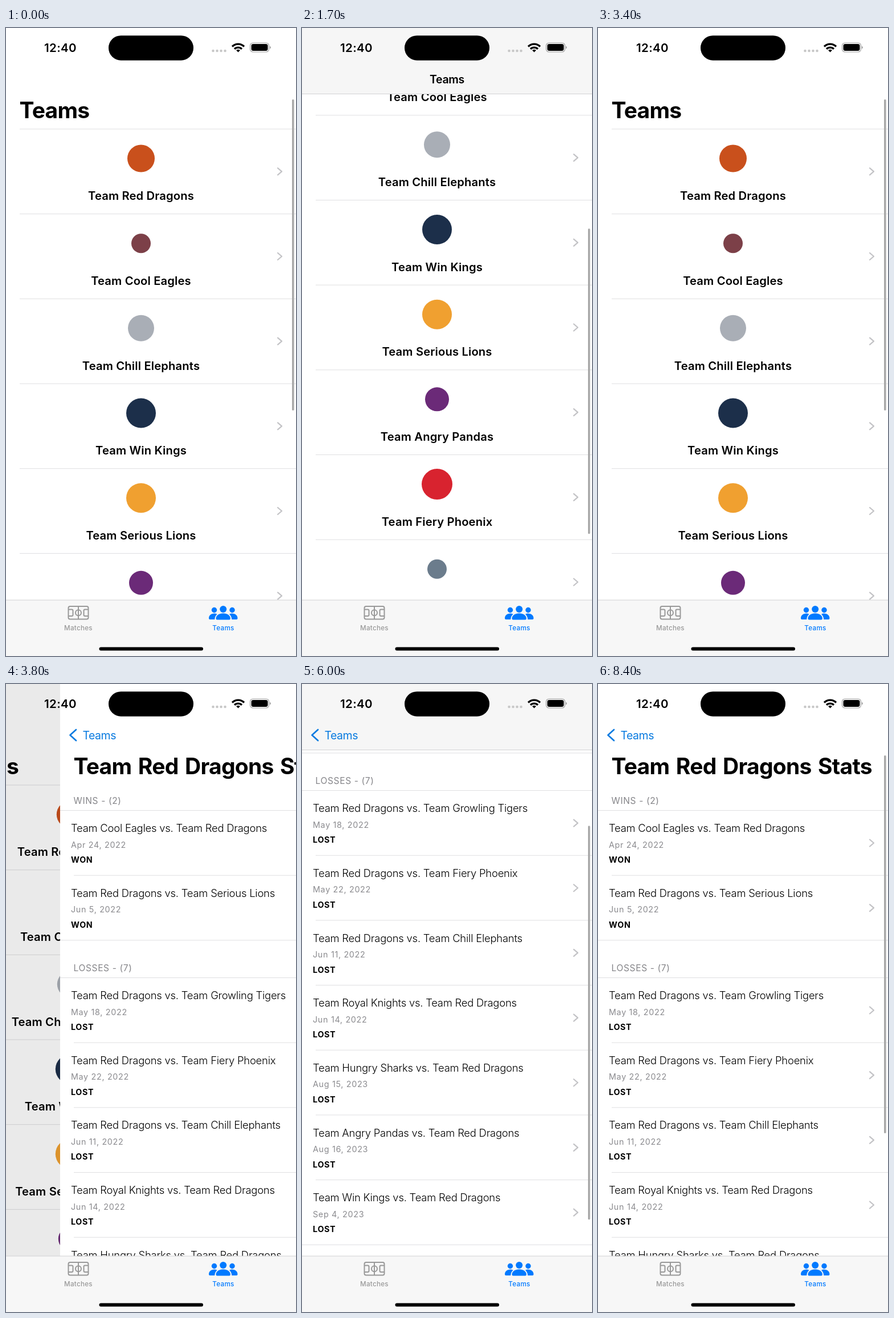
These frames come from a looping animation (509 px wide and 1100 px high, 8500 ms). An HTML page:

```html
<!DOCTYPE html>
<html lang="en">
<head>
<meta charset="utf-8">
<title>Teams</title>
<style>
  html, body { margin: 0; width: 100%; height: 100%; overflow: hidden; background: #fff; }
  svg { display: block; width: 509px; height: 1100px; }
  text { font-family: Inter, "Liberation Sans", sans-serif; font-optical-sizing: none; fill: #000; }
  .large { font-size: 39px; font-weight: 700; letter-spacing: -.75px; word-spacing: 3px; }
  .inline { font-size: 19.5px; font-weight: 600; letter-spacing: -.35px; word-spacing: 1.5px; text-anchor: middle; }
  .back { font-size: 19.5px; letter-spacing: -.5px; fill: #0a7be0; }
  .team { font-size: 20.2px; font-weight: 600; letter-spacing: .15px; text-anchor: middle; }
  .match { font-size: 18.4px; font-weight: 300; letter-spacing: -.21px; }
  .head { font-size: 15.5px; letter-spacing: .65px; fill: #858589; }
  .date { font-size: 14.3px; letter-spacing: .7px; fill: #8a8a8e; }
  .result { font-size: 14.3px; font-weight: 700; letter-spacing: .7px; }
  .clock { font-size: 20.5px; font-weight: 600; letter-spacing: .35px; text-anchor: middle; }
  .tab { font-size: 11.7px; font-weight: 500; letter-spacing: .25px; text-anchor: middle; fill: #999; }
  .tab.on { fill: #007aff; }
  .line { fill: #dfdfe1; }
  .edge { fill: #d2d2d4; }
  .chev { fill: none; stroke: #c3c3c6; stroke-width: 2.2; stroke-linecap: round; stroke-linejoin: round; }
  .bar { fill: #a9a9a9; }
</style>
</head>
<body>
<svg viewBox="0 0 509 1100">
  <defs><clipPath id="below"><rect y="115" width="509" height="985"/></clipPath></defs>
  <g id="list"></g>
  <rect id="dim" width="509" height="1100" opacity="0"/>
  <g id="stats"></g>

  <g id="tabs">
    <rect y="1002" width="509" height="98" fill="#fff"/>
    <g id="tabFill">
      <rect y="1002" width="509" height="98" fill="#f7f7f7"/>
      <rect class="edge" y="1001.5" width="509" height="1"/>
    </g>
    <g fill="none" stroke="#999" stroke-width="2">
      <rect x="109.500" y="1013" width="35" height="22.500" rx="3"/>
      <path d="M127 1013v22.500M110 1018.500h5.500q2 0 2 2v7.500q0 2-2 2H110M144 1018.500h-5.500q-2 0-2 2v7.500q0 2 2 2h5.500"/>
      <circle cx="127" cy="1024.300" r="5"/>
    </g>
    <g fill="#007aff">
      <circle cx="365.500" cy="1019.500" r="4.700"/>
      <circle cx="397" cy="1019.500" r="4.700"/>
      <path d="M356 1034c0-5 4-8.500 9.500-8.500 2 0 3.700.5 5 1.300-2.700 2.400-4 5.200-4.300 9.200H358q-2 0-2-2zM406.500 1034c0-5-4-8.500-9.500-8.500-2 0-3.700.5-5 1.300 2.700 2.400 4 5.200 4.300 9.200h8.200q2 0 2-2z"/>
      <circle cx="381.200" cy="1018" r="6"/>
      <path d="M368.500 1034.500c0-5.500 5.200-9.300 12.700-9.300s12.700 3.800 12.700 9.300q0 2-2 2h-21.400q-2 0-2-2z"/>
    </g>
    <text class="tab" x="127" y="1051" dy=".36em">Matches</text>
    <text class="tab on" x="381.500" y="1051" dy=".36em">Teams</text>
    <rect x="163.500" y="1084.500" width="182.500" height="6" rx="3"/>
  </g>

  <g id="status">
    <text class="clock" x="95.500" y="34.500" dy=".36em">12:40</text>
    <rect x="180" y="13.200" width="149" height="43.500" rx="21.700"/>
    <path d="M363.500 40h22" stroke="#c8c8c8" stroke-width="4.600" stroke-linecap="round" stroke-dasharray="0 7"/>
    <g fill="none" stroke="#000" stroke-width="3.300">
      <path d="M397 32.500a15 15 0 0 1 21 0"/>
      <path d="M401 36.700a9.300 9.300 0 0 1 13 0"/>
    </g>
    <path d="M407.500 42.500l-3.400-3.500a4.900 4.900 0 0 1 6.800 0z"/>
    <rect x="428.500" y="26" width="33" height="16" rx="5" fill="none" stroke="#a0a0a0" stroke-width="1.200"/>
    <rect x="430.500" y="28" width="29" height="12" rx="3.400"/>
    <path d="M463 31.500q2 1 2 2.500t-2 2.500z" fill="#a0a0a0"/>
  </g>
</svg>
<script>
const LOOP = 8500, STEP = 100, W = 509;
const $ = id => document.getElementById(id);
const clamp = v => Math.max(0, Math.min(1, v));
const text = (cls, x, y, s) => `<text class="${cls}" x="${x}" y="${y}" dy=".36em">${s}</text>`;
const line = (x, y) => `<rect class="line" x="${x}" y="${y - .5}" width="${W - x}" height="1"/>`;
const chevron = y => `<path class="chev" d="M477 ${y - 6}l7 6-7 6"/>`;

// name, badge colour, badge radius
const teams = [
  ["Red Dragons", "#c9501c", 24], ["Cool Eagles", "#7c4048", 17],
  ["Chill Elephants", "#a9aeb6", 23], ["Win Kings", "#1c2f4a", 26],
  ["Serious Lions", "#f0a030", 26], ["Angry Pandas", "#6b2a78", 21],
  ["Fiery Phoenix", "#d8232f", 27], ["Hungry Sharks", "#6b7c8c", 17],
  ["Growling Tigers", "#e0761f", 29], ["Royal Knights", "#c0283c", 25]
];
const wins = [[1, 0, "Apr 24, 2022"], [0, 4, "Jun 5, 2022"]];
const losses = [
  [0, 8, "May 18, 2022"], [0, 6, "May 22, 2022"], [0, 2, "Jun 11, 2022"],
  [9, 0, "Jun 14, 2022"], [7, 0, "Aug 15, 2023"], [5, 0, "Aug 16, 2023"],
  [3, 0, "Sep 4, 2023"]
];

function teamRows() {
  return line(24, 177) + teams.map(([name, color, r], i) => {
    const y = 177 + 148.67 * i;
    return `<circle cx="237" cy="${y + 51.5}" r="${r}" fill="${color}"/>` +
      text("team", 237, y + 117, "Team " + name) + chevron(y + 74.3) + line(24, y + 148.67);
  }).join("");
}

function section(title, top, games, result) {
  const rows = games.map(([a, b, date], i) => {
    const y = top + 113.67 * i;
    return text("match", 19, y + 31, `Team ${teams[a][0]} vs. Team ${teams[b][0]}`) +
      text("date", 19, y + 60, date) + text("result", 19, y + 86.5, result) +
      chevron(y + 57) + line(i < games.length - 1 ? 24 : 0, y + 113.67);
  });
  return text("head", 23.5, top - 17.5, `${title} - (${games.length})`) + line(0, top) + rows.join("");
}

// A navigation page: scrolling body, collapsing title and scroll indicator.
function page(id, title, body, titleX, extra, metrics) {
  const el = $(id);
  el.innerHTML = `<rect width="${W}" height="1100" fill="#fff"/>
    <g clip-path="url(#below)"><g class="scroll"><g class="title">${text("large", 0, 0, title)}</g>${body}</g></g>
    <g class="nav"><rect width="${W}" height="115" fill="#f6f6f6"/><rect class="edge" y="115" width="${W}" height="1"/></g>
    ${text("inline", titleX, 89.5, title)}${extra}
    <rect class="bar" x="502" width="3.6" rx="1.8"/>`;
  const q = s => el.querySelector(s);
  return { el, scroll: q(".scroll"), title: q(".title"), nav: q(".nav"), inline: q(".inline"), bar: q(".bar"), ...metrics };
}

const list = page("list", "Teams", teamRows(), 254.5, "", {
  max: 696, travel: 343, len: 545, shrink: 15,
  keys: [[0, 0], [600, 715], [700, 704], [800, 696], [1300, 696], [2100, -53], [2300, -53],
    [2400, -8], [2500, -8], [2600, 0], [2800, 0], [3050, -28], [3300, 0]]
});
const stats = page("stats", "Team Red Dragons Stats",
  section("WINS", 221.5, wins, "WON") + section("LOSSES", 514.5, losses, "LOST"), 255,
  `<path d="M28 80l-10.500 9.500L28 99" fill="none" stroke="#0a7be0" stroke-width="2.700" stroke-linecap="round" stroke-linejoin="round"/>` +
  text("back", 39.5, 89.5, "Teams"), {
  max: 352.3, travel: 183, len: 690, shrink: 0,
  keys: [[5600, 0], [6100, 366], [6200, 366], [6300, 358], [6400, 354], [6500, 354], [6600, 352.3],
    [6700, 352.3], [6950, 374], [7200, 352.3], [7300, 352.3], [7700, 10], [7800, 10], [8000, -28],
    [8300, -28], [8400, 0]]
});

function offset(keys, t) {
  const i = keys.findIndex(k => k[0] > t);
  if (i === 0) return keys[0][1];
  if (i < 0) return keys[keys.length - 1][1];
  const [t0, a] = keys[i - 1], [t1, b] = keys[i], u = (t - t0) / (t1 - t0);
  return a + (b - a) * u * u * (3 - 2 * u);
}

// The indicator and the small title trail the content slightly.
function drawPage(p, t, barAlpha) {
  const s = offset(p.keys, t), lag = offset(p.keys, t - 100);
  p.scroll.setAttribute("transform", `translate(0 ${-s})`);
  p.title.setAttribute("transform", `translate(23.500 144) scale(${1 + Math.max(0, -s) * .0005})`);
  p.nav.setAttribute("opacity", clamp((s - 55) / 10));
  p.inline.setAttribute("opacity", clamp((offset(p.keys, t - 300) - 58) / 100));
  const u = clamp(lag / p.max), over = Math.max(0, -lag, lag - p.max);
  p.bar.setAttribute("y", 125 + p.travel * u + Math.max(0, lag - p.max));
  p.bar.setAttribute("height", p.len - p.shrink * u - over);
  p.bar.setAttribute("opacity", barAlpha);
  return clamp((p.max - s) / 12);
}

function draw(t) {
  const push = 1 - (1 - clamp((t - 3500) / 700)) ** 3;
  const statsBar = t < 4200 ? 0 : t < 5600 ? clamp((5600 - t) / 550) : 1;
  const fills = [drawPage(list, t, clamp((3900 - t) / 400)), drawPage(stats, t, statsBar)];
  list.el.setAttribute("transform", `translate(${-.3 * W * push} 0)`);
  stats.el.setAttribute("transform", `translate(${W * (1 - push)} 0)`);
  stats.el.style.display = push ? "" : "none";
  $("dim").setAttribute("opacity", .1 * push);
  $("tabFill").setAttribute("opacity", fills[push ? 1 : 0]);
}

// The picture advances ten times a second.
const start = performance.now();
function tick() {
  const t = (performance.now() - start) % LOOP;
  draw(Math.floor(t / STEP) * STEP);
  requestAnimationFrame(tick);
}
tick();
</script>
</body>
</html>
```
